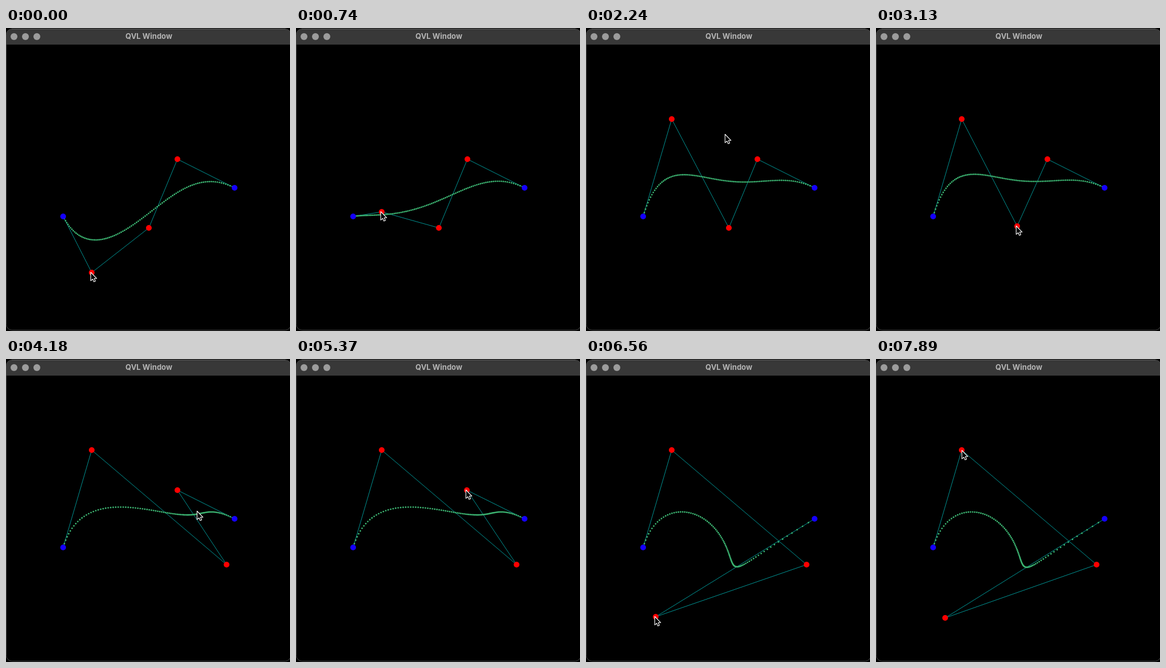
Recreate the animation shown at these times as an HTML page with a canvas. Size 497 px wide and 529 px high, loop 8000 ms.

```html
<!DOCTYPE html>
<html lang="en">
<head>
<meta charset="utf-8">
<title>Curve editor</title>
<style>
  html, body { margin: 0; width: 100%; height: 100%; overflow: hidden; background: #000; }
  canvas { display: block; }
</style>
</head>
<body>
<canvas id="stage" width="497" height="529"></canvas>
<script>
const ctx = document.getElementById('stage').getContext('2d');
const LOOP = 8000, START = 440, STEP = 149;

// Pointer moves; the times are in steps and bend bows the path sideways.
const HOME = [150, 427];
const MOVES = [
  { from: -1, to: 6, x: 150, y: 157 },
  { from: 7, to: 8, x: 150, y: 159 },
  { from: 9, to: 17, x: 250, y: 349, bend: -85 },
  { from: 17, to: 18, x: 247, y: 346 },
  { from: 18, to: 22, x: 386, y: 359 },
  { from: 24, to: 25, x: 336, y: 266 },
  { from: 25, to: 28, x: 307, y: 235 },
  { from: 29, to: 33, x: 299, y: 229 },
  { from: 33, to: 37, x: 119, y: 431, bend: 90 },
  { from: 40, to: 41, x: 122, y: 450 },
  { from: 41, to: 42, x: 121, y: 452 },
  { from: 45, to: 50, x: 152, y: 160, bend: 75 }
];

const arrow = new Path2D('M0 0V14.8L3.4 11.8L5.5 16.6L8.1 15.5L6.1 10.8H10.5Z');

const ease = u => u * u * (3 - 2 * u);

function pointer(step) {
  let [x, y] = HOME;
  for (const move of MOVES) {
    if (step <= move.from) break;
    const e = ease(Math.min(1, (step - move.from) / (move.to - move.from)));
    const dx = move.x - x, dy = move.y - y;
    const bow = (move.bend || 0) * Math.sin(Math.PI * e) / Math.hypot(dx, dy);
    x += dx * e - dy * bow;
    y += dy * e + dx * bow;
  }
  return [Math.round(x), Math.round(y)];
}

// A handle rests until it is grabbed, then follows the pointer until release.
function handle(rest, grab, release, step) {
  return step < grab ? rest : pointer(Math.min(step, release));
}

function bezier(points, t) {
  while (points.length > 1) {
    points = points.slice(1).map((p, i) => p.map((v, n) => points[i][n] * (1 - t) + v * t));
  }
  return points[0];
}

function dot([x, y], radius, color) {
  ctx.fillStyle = color;
  ctx.beginPath();
  ctx.arc(x, y, radius, 0, Math.PI * 2);
  ctx.fill();
}

function drawWindow() {
  ctx.fillStyle = '#000';
  ctx.fillRect(0, 0, 497, 529);
  ctx.save();
  ctx.beginPath();
  ctx.roundRect(0.5, 1.5, 498, 526, 10);
  ctx.clip();
  ctx.fillStyle = '#383838';
  ctx.fillRect(0, 1, 497, 28);
  ctx.restore();
  ctx.strokeStyle = '#484848';
  ctx.lineWidth = 1;
  ctx.stroke();
  ctx.fillStyle = '#666';
  ctx.fillRect(10, 1, 479, 1);
  for (const x of [14, 34, 54]) dot([x, 15], 6, '#9c9c9c');
  ctx.fillStyle = '#b4b4b4';
  ctx.font = '700 13px Inter, sans-serif';
  ctx.textAlign = 'center';
  ctx.fillText('QVL Window', 250, 19);
}

function drawCursor([x, y]) {
  ctx.save();
  ctx.translate(x - 1.7, y - 0.5);
  ctx.fillStyle = '#000';
  ctx.strokeStyle = '#fff';
  ctx.lineWidth = 1.1;
  ctx.lineJoin = 'round';
  ctx.fill(arrow);
  ctx.stroke(arrow);
  ctx.restore();
}

function draw(ms) {
  const step = Math.max(-1, Math.floor((ms - START) / STEP));
  const points = [
    [100, 329],
    handle(HOME, -1, 9, step),
    handle([250, 349], 18, 22, step),
    handle([300, 229], 33, 42, step),
    [400, 279]
  ];
  drawWindow();

  ctx.strokeStyle = '#0aa';
  ctx.lineWidth = 0.85;
  ctx.beginPath();
  for (const p of points) ctx.lineTo(...p);
  ctx.stroke();

  for (let i = 0; i <= 100; i++) dot(bezier(points, i / 100), 1.4, '#3cb371');
  points.forEach((p, i) => dot(p, 5, i % 4 ? '#f00' : '#1400ff'));
  drawCursor(pointer(step));
}

const began = performance.now();
function frame() {
  draw((performance.now() - began) % LOOP);
  requestAnimationFrame(frame);
}
frame();
</script>
</body>
</html>
```
